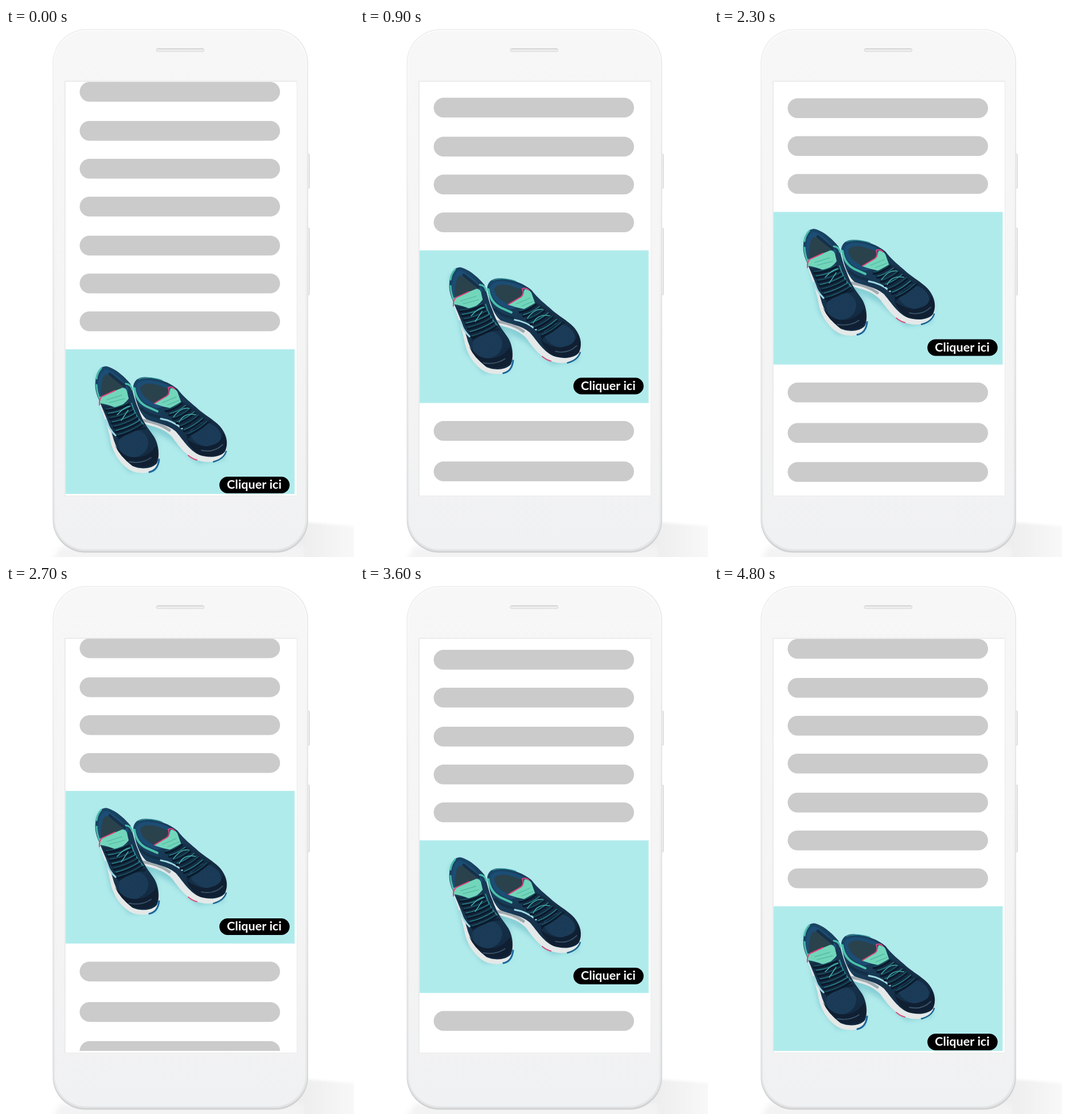
These frames come from a looping animation (607x922 px, 5800 ms). An HTML page with a canvas:

```html
<!DOCTYPE html>
<html lang="fr">
<head>
<meta charset="utf-8">
<style>
  html, body { margin: 0; width: 100%; height: 100%; overflow: hidden; background: #fff; }
  canvas { display: block; width: 607px; height: 922px; }
</style>
</head>
<body>
<canvas id="stage" width="607" height="922"></canvas>
<script>
const ctx = document.getElementById('stage').getContext('2d');

const LOOP = 5800, STEP = 100;
const UP_STEPS = 13, HOLD_END = 22, DOWN_STEPS = 26;
const AD_REST = 560, TRAVEL = 249;
// Bar tops relative to the top of the advert
const BARS = [-466, -398, -332, -266, -198, -132, -66, 297.5, 368, 436, 503];

function fill(path, color) {
  ctx.fillStyle = color;
  ctx.fill(new Path2D(path));
}

function stroke(path, color, width) {
  ctx.strokeStyle = color;
  ctx.lineWidth = width;
  ctx.stroke(new Path2D(path));
}

function pill(x, y, w, h, r, color, edge) {
  ctx.beginPath();
  ctx.roundRect(x, y, w, h, r);
  ctx.fillStyle = color;
  ctx.fill();
  if (edge) {
    ctx.strokeStyle = edge;
    ctx.lineWidth = 1;
    ctx.stroke();
  }
}

function gradient(x0, y0, x1, y1, ...colors) {
  const g = ctx.createLinearGradient(x0, y0, x1, y1);
  colors.forEach((c, i) => g.addColorStop(i / (colors.length - 1), c));
  return g;
}

function blurred(radius, paint) {
  ctx.save();
  ctx.filter = `blur(${radius}px)`;
  paint();
  ctx.restore();
}

function drawPhone() {
  ctx.fillStyle = '#fff';
  ctx.fillRect(0, 0, 607, 922);
  blurred(2, () => fill('M480 862H530L615 869V930H480Z', gradient(520, 0, 607, 0, '#eeeeee', '#f8f8f8')));
  blurred(5, () => fill('M95 904H520V930H80Z', '#f3f3f3'));

  pill(524.5, 219.5, 5, 60, 2, '#ececec', '#d4d5d6');
  pill(524.5, 348.5, 5, 117, 2, '#ececec', '#d4d5d6');
  const rim = gradient(0, 2, 0, 914, '#e6e7e7', '#dfe0e1', '#d0d2d4');
  pill(81.5, 2, 445.5, 912.5, [59, 59, 57, 57], rim);
  pill(82.5, 3, 443, 908.5, [58, 58, 56, 56], gradient(0, 3, 0, 911, '#fafafa', '#eeeff0', '#e3e5e6'));
  pill(85, 5.5, 437.5, 903, [56, 56, 54, 54], gradient(0, 5, 0, 908, '#f7f7f7', '#f5f5f5', '#f0f1f2'));
  pill(262, 36, 83.5, 5, 2.5, '#eeeeee', '#d3d3d3');
  stroke('M264 36.5H344', '#c8c8c8', 1);

  pill(102.5, 92.5, 405, 723, 1, '#fff', '#ececed');
  stroke('M103 816V93H508', '#e3e4e4', 1.2);
}

function dots(cx, cy, rx, ry, angle) {
  ctx.save();
  ctx.translate(cx, cy);
  ctx.rotate(angle);
  ctx.beginPath();
  ctx.ellipse(0, 0, rx, ry, 0, 0, Math.PI * 2);
  ctx.fillStyle = '#1d405e';
  ctx.fill();
  ctx.clip();
  ctx.fillStyle = '#16304a';
  for (let y = -ry; y < ry; y += 3)
    for (let x = -rx; x < rx; x += 3) ctx.fillRect(x, y, 1.7, 1.7);
  ctx.restore();
}

function laces(count, left, right) {
  for (let i = 0; i < count; i++) {
    const [x0, y0] = left(i), [x1, y1] = right(i);
    const curve = dy => `M${x0} ${y0 + dy}Q${(x0 + x1) / 2} ${(y0 + y1) / 2 + 4 + dy} ${x1} ${y1 + dy}`;
    stroke(curve(2.5), '#0b1a2b', 4.5);
    stroke(curve(0), i % 2 ? '#28808a' : '#1a5566', 1.6);
  }
}

function drawLeftShoe() {
  fill('M156 616C157 600 164 590 174 589.5C190 592 207 608 217 620C222 636 225 651 231 664C238 686 249 699 258 712C268 727 269 754 265 765C256 778 231 778 217 771C200 761 186 741 182 718C177 692 167 667 160 646C156 634 155 625 156 616Z', '#e4e8e7');
  stroke('M250 774Q265 771 267 752', '#1c679c', 3);
  fill('M156 616C157 600 164 590 174 589.5C190 592 207 608 217 620C222 636 225 651 231 664C238 686 249 699 258 712C268 728 268 750 263 759C253 770 231 769 220 763C204 750 191 733 186 711C180 689 170 668 161 646C156 634 155 625 156 616Z',
    gradient(160, 600, 262, 760, '#184566', '#17354f', '#12283e'));
  // Collar and opening
  fill('M162 612C164 601 169 595 176 595C191 602 205 614 214 629L209 641L166 652C160 637 159 624 162 612Z', '#1c4d74');
  fill('M168 617C168 608 172 604 177 604C189 612 201 620 207 630L167 644C164 634 165 625 168 617Z', '#2a424c');
  stroke('M181 603L207 624', '#173048', 5);
  stroke('M158 622Q158 634 164 648M166 593Q159 601 158 611', '#4cbcaa', 3);
  stroke('M209 620Q218 621 220 630', '#48bfad', 3);
  // Tongue
  fill('M164 643L203 627Q209 627 211 633L214 646Q206 657 192 662Q178 656 164 654Z', '#72d6bb');
  stroke('M163 657Q162 646 168 642L190 632', '#df4379', 2);
  stroke('M176 648L202 640M180 653L207 646', '#57bba7', 1.5);
  // Sides and toe
  stroke('M174 683Q180 700 191 710', '#9fd9e2', 3);
  stroke('M219 654Q226 678 239 690', '#2f8d95', 2);
  fill('M167 658Q181 657 192 664L215 652L235 695L198 714Q180 685 167 658Z', '#142c42');
  dots(222, 724, 26, 24, -0.25);
  fill('M190 727Q207 750 225 748Q248 749 262 728Q268 750 259 759Q242 769 220 762Q199 748 190 727Z', '#101f32');
  stroke('M215 756Q237 760 253 749', '#3a5369', 1.8);
  stroke('M197 715Q218 699 242 698', '#0f2337', 4);
  laces(7, i => [175 + 3.4 * i, 664 + 7.5 * i], i => [213 + 4 * i, 653 + 6.2 * i]);
  stroke('M194 674Q207 660 216 659M201 684L213 666', '#45b3ae', 1.5);
}

function drawRightShoe() {
  fill('M222 624C224 612 234 607 248 609C268 611 285 618 299 629C310 644 323 653 336 665C354 680 373 688 381 706C387 718 386 733 383 741C375 757 352 759 336 754C315 747 303 731 290 713C276 698 258 695 245 691C234 683 226 657 222 624Z', '#e4e8e8');
  // Heel sole texture
  stroke('M240 684Q267 688 285 701', '#a0abb0', 5);
  stroke('M318 745Q325 751 333 753', '#d6507e', 2);
  stroke('M362 756Q380 751 384 738', '#1b6592', 2.5);
  fill('M222 624C224 612 234 607 248 609C268 611 285 618 299 629C310 644 323 653 336 665C354 680 373 688 381 706C387 718 386 730 382 738C373 750 350 749 337 744C318 735 308 716 296 703C280 690 260 688 245 682C233 671 225 650 222 624Z',
    gradient(225, 615, 380, 745, '#184566', '#17354f', '#11263b'));
  // Collar and opening
  fill('M227 625C230 614 244 612 258 615C276 618 290 625 298 633L286 656L263 663C242 657 229 646 227 625Z', '#1c4d74');
  fill('M234 627C238 619 250 618 264 622L284 629L279 643L259 654C245 648 235 639 234 627Z', '#2a424c');
  stroke('M224 628Q227 651 246 660L264 668', '#4cc0ab', 4);
  stroke('M231 612Q249 606 272 614', '#2f8d95', 1.5);
  stroke('M236 663Q246 674 267 678', '#142f46', 5);
  // Tongue
  fill('M259 655L284 639L287 628Q295 627 299 634L306 654L289 663Q273 660 259 655Z', '#72d6bb');
  stroke('M259 654L281 641Q287 636 283 627Q289 624 294 629', '#df4379', 2);
  stroke('M273 653L297 643M282 657L302 649', '#57bba7', 1.5);
  // Sides and toe
  stroke('M270 681Q290 684 307 698', '#9fd9e2', 3);
  fill('M278 667L307 651Q334 664 354 686L323 711Q300 690 278 667Z', '#142c42');
  dots(348, 708, 28, 20, 0.35);
  fill('M315 716Q341 735 359 727Q376 723 379 706Q389 724 381 738Q365 750 338 744Q323 735 315 716Z', '#101f32');
  stroke('M341 736Q363 741 378 726', '#3a5369', 1.8);
  stroke('M317 714Q329 695 356 686', '#0f2337', 4);
  laces(7, i => [279 + 6.4 * i, 665 + 7 * i], i => [306 + 7.4 * i, 652 + 5.6 * i]);
  stroke('M292 678Q306 660 319 663M302 687Q310 670 331 674', '#3fa9a6', 1.5);
}

function drawAd() {
  ctx.fillStyle = '#b0ebec';
  ctx.fillRect(104, AD_REST, 399.5, 266);
  ctx.lineCap = ctx.lineJoin = 'round';

  blurred(4, () => {
    fill('M156 606L174 594L228 664L262 715L262 768L215 774L184 735Z', 'rgba(70,165,180,.4)');
    fill('M226 625L300 640L382 715L380 752L335 759L288 719L240 695Z', 'rgba(70,165,180,.4)');
  });
  drawRightShoe();
  drawLeftShoe();

  pill(372.2, 782, 122.5, 29, 14.5, '#000');
  ctx.fillStyle = '#fff';
  ctx.font = '700 21.5px Lato, "Open Sans", sans-serif';
  ctx.textAlign = 'center';
  ctx.fillText('Cliquer ici', 433, 803.3);
}

function scrollAt(time) {
  const step = Math.floor((time % LOOP) / STEP);
  const share = step <= HOLD_END
    ? Math.min(step / UP_STEPS, 1)
    : Math.max(1 - (step - HOLD_END) / DOWN_STEPS, 0);
  return TRAVEL * share;
}

function draw(time) {
  drawPhone();
  ctx.save();
  ctx.beginPath();
  ctx.rect(104, 93.5, 400, 718.5);
  ctx.clip();
  ctx.translate(0, -scrollAt(time));
  for (const offset of BARS) pill(128.5, AD_REST + offset, 349.5, 34.5, 17.25, '#cbcbcb');
  drawAd();
  ctx.restore();
}

let start;
function tick(now) {
  start ??= now;
  draw(now - start);
  requestAnimationFrame(tick);
}
draw(0);
requestAnimationFrame(tick);
</script>
</body>
</html>
```
